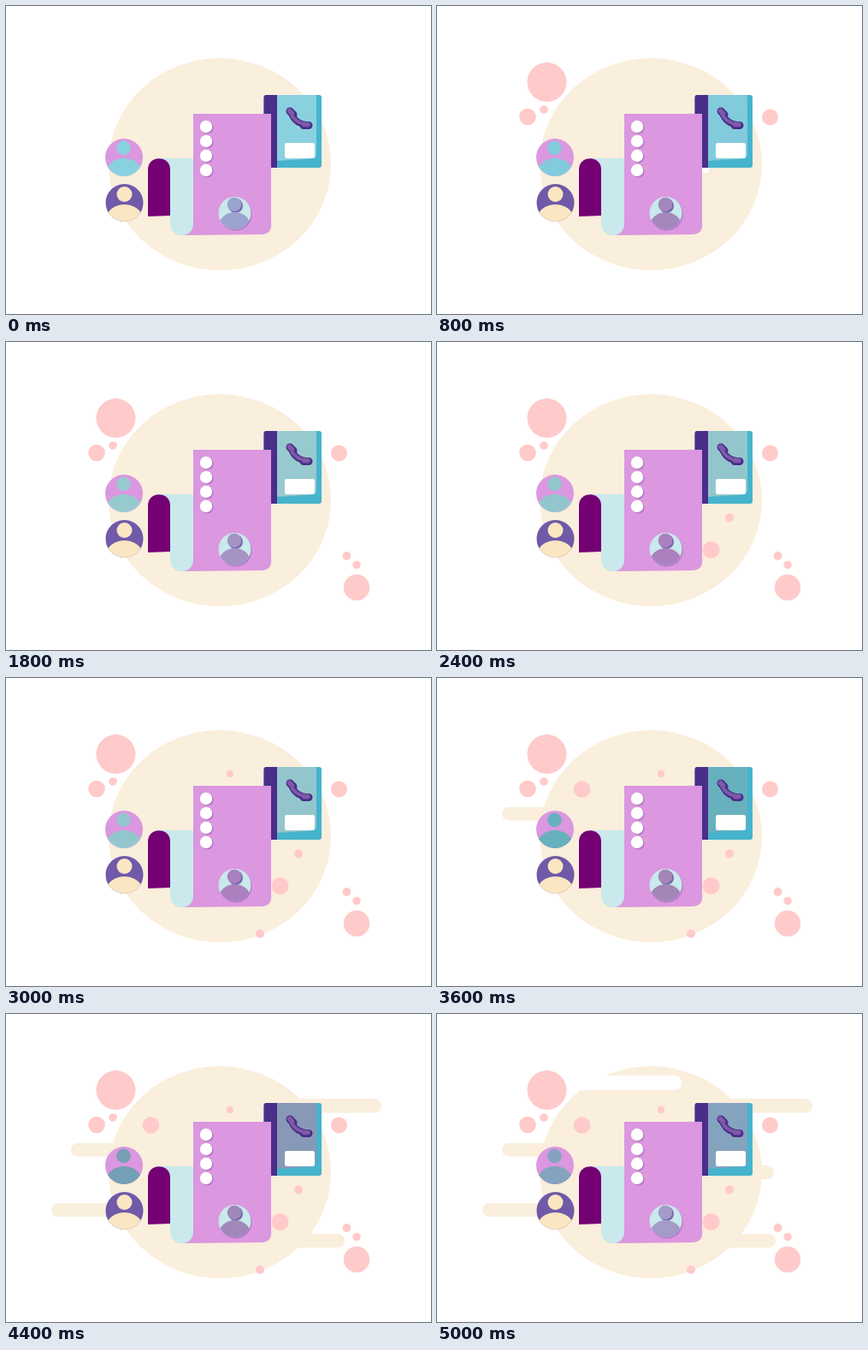
Animation, 497 px wide and 360 px high, one loop 5200 ms. Source, as an HTML page:

```html
<!DOCTYPE html>
<html lang="en">
<head>
<meta charset="utf-8">
<title>Contacts</title>
<style>
  html, body { margin: 0; width: 100%; height: 100%; overflow: hidden; background: #fff; }
  svg { display: block; width: 497px; height: 360px; }
  .cream { fill: #faeedc; }
  .pink { fill: #ffcaca; }
  .orchid { fill: #db97df; }
  .ice { fill: #c9e9ed; }
  .violet { fill: #7059a8; }
  .sand { fill: #fae6c2; }
  .indigo { fill: #4b2d8a; }
  .white { fill: #fff; }
  .shade { fill: #b276c4; }
</style>
</head>
<body>
<svg viewBox="0 0 497 360">
  <defs>
    <clipPath id="clipA"><circle cx="138" cy="177" r="22"/></clipPath>
    <clipPath id="clipB"><circle cx="138.5" cy="230" r="22"/></clipPath>
    <clipPath id="clipC"><circle cx="267.5" cy="242" r="19"/></clipPath>
  </defs>

  <ellipse class="cream" cx="250" cy="185" rx="130" ry="124"/>
  <g id="bands"></g>
  <circle id="chip" class="white" cx="314" cy="191" r="4"/>
  <path id="gap" class="white" d="M309 188H331Q318 192 316.500 208Q316 228 310 242Z"/>
  <g id="bubbles" class="pink"></g>

  <!-- phone book -->
  <rect x="301.500" y="104" width="67.500" height="85" rx="3" fill="#45b4ce"/>
  <path class="indigo" d="M317 104V189H304.500Q301.500 189 301.500 186V107Q301.500 104 304.500 104Z"/>
  <path class="tint cover" d="M317 104H363V173Q363 178 357 178.500L317 181Z"/>
  <rect class="white" x="326" y="160" width="35" height="18" rx="2.500"/>
  <g fill="none" stroke-linecap="round">
    <g stroke="#4b2d8a">
      <path d="M334 126Q338 137 351 139" stroke-width="7.500"/>
      <path d="M332 123L336 127M348 139.500L354 139.500" stroke-width="9"/>
    </g>
    <g stroke="#7c5aa8">
      <path d="M333 125Q337 136 350 138" stroke-width="4"/>
      <path d="M331.500 122.500L334.500 125.500M348.500 138.500L353 138.500" stroke-width="5.500"/>
    </g>
  </g>

  <!-- unrolled sheet -->
  <path class="orchid" d="M219 126H310V252Q312 267 298 267L205 268L219 250Z"/>
  <path class="ice" d="M179 178H219V254C219 273 192 273 192 254V205H179Z"/>
  <path fill="#750073" d="M166 246V191C166 174 192 174 192 191V245Z"/>
  <g id="dots"></g>

  <circle class="shade" cx="268.500" cy="243.500" r="19"/>
  <circle class="ice" cx="267.500" cy="242" r="19"/>
  <g clip-path="url(#clipC)">
    <circle cx="268.500" cy="233.500" r="8.500" fill="#7567ae"/>
    <circle class="person" cx="267" cy="232" r="8.300"/>
    <ellipse class="person" cx="267.500" cy="257" rx="18.500" ry="16"/>
  </g>

  <!-- contacts -->
  <circle class="orchid" cx="138" cy="177" r="22"/>
  <g clip-path="url(#clipA)" class="tint avatar">
    <circle cx="137.500" cy="166" r="8.300"/>
    <ellipse cx="138" cy="194" rx="20.500" ry="16"/>
  </g>
  <circle class="violet" cx="138.500" cy="230" r="22"/>
  <g clip-path="url(#clipB)" class="sand">
    <circle cx="138.500" cy="220" r="9"/>
    <ellipse cx="138.500" cy="248" rx="21" ry="16"/>
  </g>
</svg>
<script>
const DURATION = 5200;
const $ = selector => document.querySelector(selector);

function add(parent, tag, attrs) {
  const el = document.createElementNS('http://www.w3.org/2000/svg', tag);
  for (const key in attrs) el.setAttribute(key, attrs[key]);
  return $(parent).appendChild(el);
}

// Holds each value from its time until the next one.
function hold(el, property, steps) {
  const frames = steps.map(([time, value]) =>
    ({ offset: time / DURATION, [property]: value, easing: 'step-end' }));
  frames.push({ offset: 1, [property]: steps[steps.length - 1][1] });
  el.animate(frames, { duration: DURATION, iterations: Infinity });
}

const appear = (el, time) => hold(el, 'opacity', [[0, 0], [time, 1]]);

// time, x, y, radius
const bubbles = [
  [100, 389.5, 130, 9.5], [200, 128.5, 89, 23],
  [600, 125, 121, 4.8], [800, 106, 129.5, 9.8],
  [1200, 410, 287, 15.2], [1400, 410, 260.5, 4.8],
  [1800, 398.5, 250, 5], [2000, 320.5, 243, 10],
  [2400, 342, 205.5, 5], [2600, 297, 299, 5],
  [3000, 262, 112, 4.2], [3200, 169.5, 130, 9.8]
];
for (const [time, cx, cy, r] of bubbles)
  appear(add('#bubbles', 'circle', { cx, cy, r }), time);

// time, left, right, top, height, class
const bands = [
  [3600, 76, 150, 151, 15.5, 'cream'], [3800, 320, 396, 257, 16, 'cream'],
  [4200, 53, 145, 221, 16, 'cream'], [4400, 320, 439, 99, 16.5, 'cream'],
  [4800, 350, 394, 177, 16, 'cream'], [5000, 155, 286.5, 72, 17, 'white']
];
for (const [time, x, right, y, height, name] of bands)
  appear(add('#bands', 'rect', { x, y, width: right - x, height, rx: height / 2, class: name }), time);

for (let y = 141; y <= 192; y += 17) {
  add('#dots', 'circle', { cx: 235.5, cy: y + 1.5, r: 7, class: 'shade' });
  add('#dots', 'circle', { cx: 234, cy: y, r: 7.2, class: 'white' });
}

hold($('#chip'), 'opacity', [[0, 0], [800, 1], [1400, 0]]);
hold($('#gap'), 'opacity', [[0, 0], [1400, 1], [1800, 0]]);

const times = [0, 800, 1400, 2400, 3600, 4400, 5000];
const palettes = {
  '.cover': ['#8ad1e0', '#82cbdc', '#97cacf', '#93c6cc', '#67b0bd', '#8799b6', '#84a3be'],
  '.avatar': ['#8ad1e0', '#82cbdc', '#97cacf', '#93c6cc', '#67b0bd', '#759fb4', '#84a3be'],
  '.person': ['#9ba3cf', '#a387bd', '#a394c4', '#aa80bf', '#a286b6', '#a088ba', '#a59bc9']
};
for (const selector in palettes)
  document.querySelectorAll(selector).forEach(el =>
    hold(el, 'fill', times.map((time, i) => [time, palettes[selector][i]])));
</script>
</body>
</html>
```
